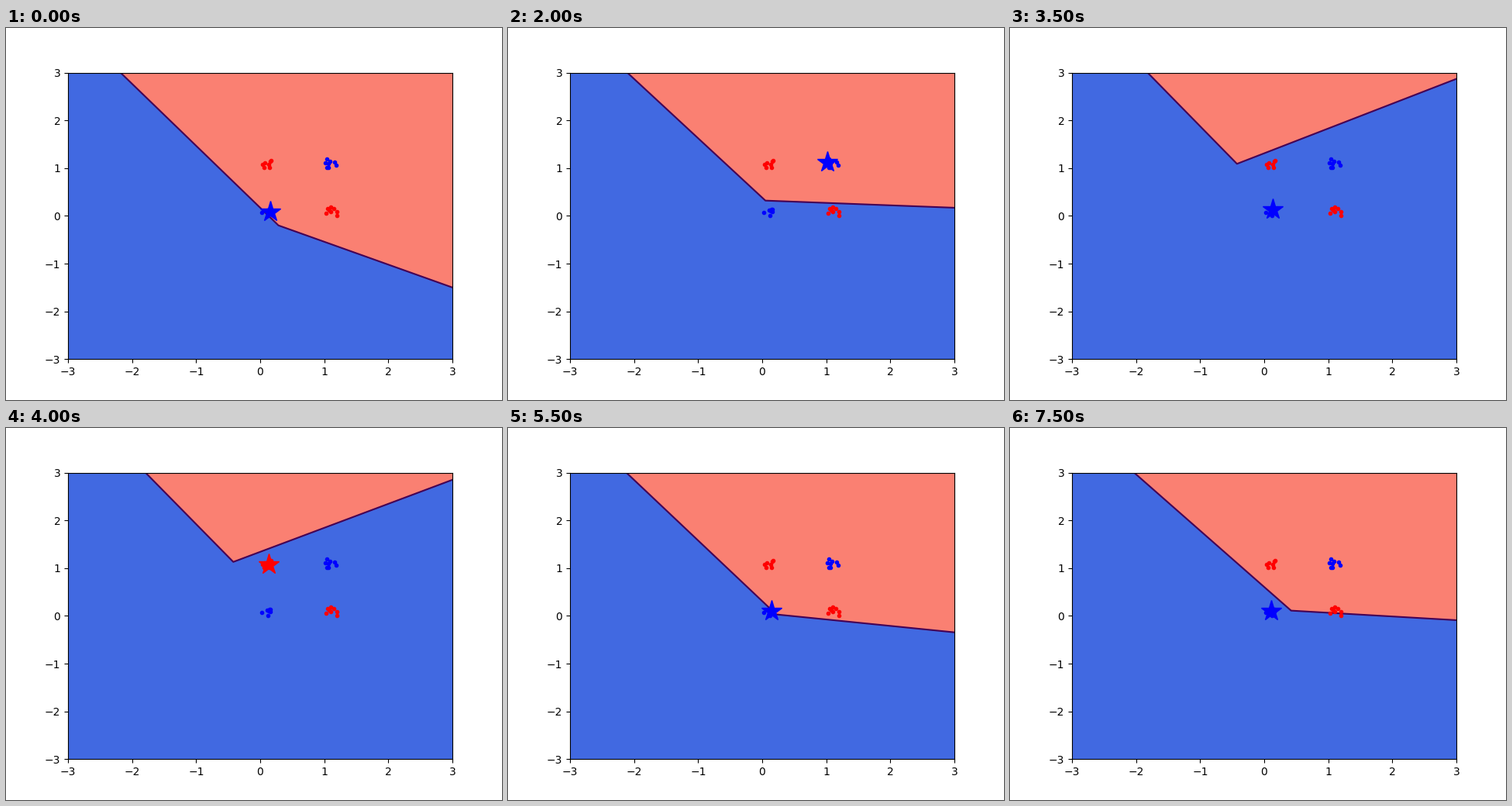
A matplotlib script for the animation above (8 s loop, 640 by 480 pixels).

```python
import matplotlib.pyplot as plt
from matplotlib.animation import FuncAnimation

CLUSTERS = [
    ("blue", [(.02, .065), (.12, 0), (.16, .13), (.11, .12), (.14, .13),
              (.16, .08), (.13, .1)]),
    ("red", [(.035, 1.07), (.07, 1.11), (.065, 1.02), (.135, 1.08),
             (.14, 1.02), (.17, 1.16), (.155, 1.14)]),
    ("red", [(1.03, .05), (1.05, .155), (1.105, .18), (1.145, .16),
             (1.095, .09), (1.2, .08), (1.2, 0), (1.08, .12)]),
    ("blue", [(1.045, 1.19), (1.015, 1.11), (1.09, 1.135), (1.165, 1.12),
              (1.18, 1.055), (1.04, 1.02), (1.07, 1.02), (1.06, 1.1)]),
]

# Per training step: x at the top edge, corner x, corner y, y at the right
# edge, then the active sample (x, y)
STEPS = [
    (-2.18, .285, -.2, -1.5, .16, .08),
    (-2.17, .3, -.18, -1.3, .07, 1.1),
    (-2.27, .44, -.32, -1.36, 1.07, 1.02),
    (-2.18, .25, 0, -.8, 1.09, 1.135),
    (-2.105, .05, .32, .17, 1.02, 1.12),
    (-1.98, -.1, .62, 1.1, .16, .14),
    (-1.955, -.25, .85, 2, 1.045, 1.19),
    (-1.82, -.425, 1.09, 2.87, .13, .13),
    (-1.79, -.42, 1.13, 2.85, .135, 1.08),
    (-1.975, -.225, .76, 1.8, .16, 1.15),
    (-2.19, .1, .2, 0, 1.2, 0),
    (-2.12, .22, .03, -.345, .15, .1),
    (-2.01, .27, .1, -.17, .16, .08),
    (-1.92, .3, .18, -.02, .14, .13),
    (-1.92, .32, .2, .1, .07, 1.11),
    (-2.03, .42, .11, -.09, .11, .11),
]

fig, ax = plt.subplots(figsize=(6.4, 4.8), dpi=100)
ax.set(xlim=(-3, 3), ylim=(-3, 3), facecolor="royalblue")

region = ax.fill([0, 1, 1], [0, 0, 1], color="salmon", lw=0, zorder=1)[0]
border, = ax.plot([], [], color="#440154", lw=1.5, zorder=2)
for color, points in CLUSTERS:
    ax.plot(*zip(*points), ".", color=color, ms=6, zorder=2.2)
star, = ax.plot([], [], "*", ms=20, zorder=2.4)


def label_color(x, y):
    """XOR label of the sample's cluster."""
    return "blue" if (x > .6) == (y > .6) else "red"


def draw(i):
    top, cx, cy, right, x, y = STEPS[i]
    region.set_xy([(top, 3), (cx, cy), (3, right), (3, 3)])
    border.set_data([top, cx, 3], [3, cy, right])
    star.set_data([x], [y])
    star.set_color(label_color(x, y))
    return region, border, star


anim = FuncAnimation(fig, draw, frames=len(STEPS), interval=500,
                     repeat=True, repeat_delay=0)
plt.show()
```
